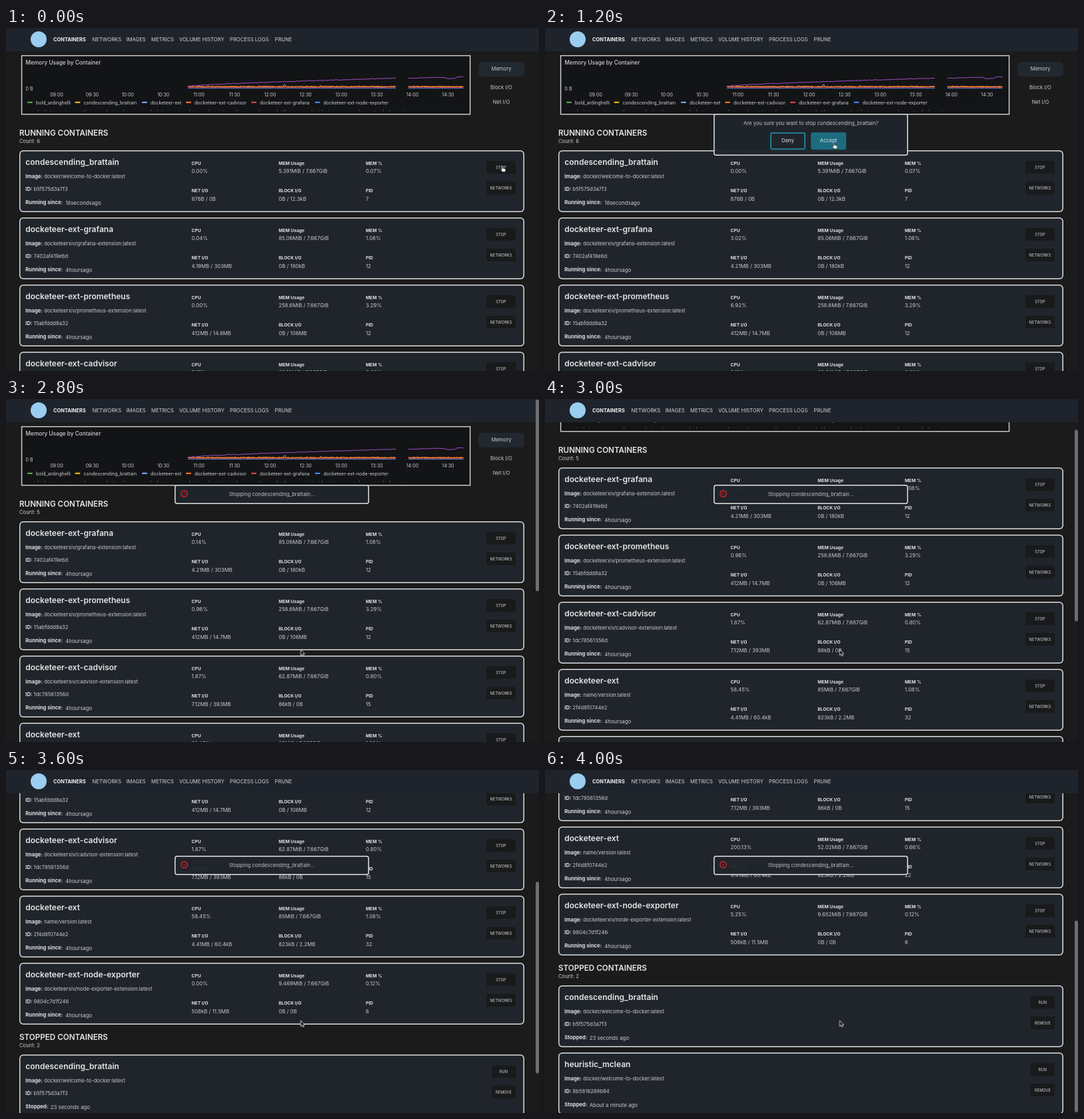
An HTML page for the animation above (4050 ms loop, 800 px wide and 516 px high).

```html
<!DOCTYPE html>
<html lang="en">
<head>
<meta charset="utf-8">
<title>Containers</title>
<style>
@property --scroll { syntax: "<number>"; inherits: true; initial-value: 0; }
html, body { margin: 0; width: 100%; height: 100%; overflow: hidden; background: #1b1b1b; }
#stage {
  position: relative; width: 800px; height: 516px; overflow: hidden;
  background: #1b1b1b; color: #c9cbcd;
  font: 7.7px/10px Inter, "Open Sans", sans-serif;
  animation: scroll 4050ms infinite;
}
#stage * { box-sizing: border-box; }
.t { position: absolute; margin-top: -5px; white-space: pre; }
.mid { transform: translateX(-50%); }
b.t { font-weight: 700; color: #dfe0e1; }
.small { font-size: 6.7px; }
.value { font-size: 7.85px; }
nav { position: absolute; inset: 0 0 auto; height: 35px; background: #1f242c; z-index: 2; }
nav .t { font-size: 7.65px; color: #d3d5d8; }
nav b.t { font-size: 7.45px; color: #f2f2f2; }
.logo { position: absolute; left: 37px; top: 5px; width: 24px; height: 24px; border-radius: 50%; background: #9acdf0; }
#page { position: absolute; left: 0; top: 0; width: 800px; transform: translateY(calc(var(--scroll) * -1px)); }
#chart { position: absolute; left: 22px; top: 40px; }
#lists { padding: 147px 0 0 20px; }
.head { position: relative; height: 37px; }
.head h2 { margin: -5px 0 0; position: absolute; top: 11px; font-size: 11.65px; font-weight: 600; line-height: 10px; color: #e6e6e6; white-space: pre; }
.card {
  position: relative; width: 758px; height: 92.5px; margin-bottom: 8.5px;
  border-radius: 6px; background: #20252b; box-shadow: inset 0 0 0 1.5px #dcddde;
}
.card .name { font-size: 12px; font-weight: 600; color: #e4e4e4; }
.btn { position: absolute; right: 13px; height: 19px; border-radius: 1.5px; background: #191a1b; font-size: 5.75px; line-height: 19px; text-align: center; color: #d5d6d7; }
.gone .first { display: none; }
.tab { position: absolute; left: 709px; top: 51px; width: 69px; height: 22px; border-radius: 5px; background: #212830; }
#thumb {
  position: absolute; left: 795px; top: 1px; width: 5px; height: 288px; border-radius: 2px;
  background: #6d6e6f; z-index: 3; transform: translateY(calc(var(--scroll) * .5615px));
  animation: bar 4050ms step-end infinite;
}
.pop {
  position: absolute; left: 253.3px; top: 129.4px; width: 291.7px; z-index: 4;
  border-radius: 4px; background: rgba(32, 37, 44, .95); box-shadow: inset 0 0 0 1.5px #e2e3e4;
}
.pop .t { left: 145.8px; top: 15.1px; color: #c0c3c6; }
#ask { height: 62.6px; animation: ask 4050ms step-end infinite; }
#toast { height: 29px; animation: toast 4050ms step-end infinite; }
.pop button {
  position: absolute; top: 28px; width: 53px; height: 26px; padding: 0; border: 0;
  border-radius: 3px; background: #20252c; box-shadow: inset 0 0 0 1.8px #24869b; font: inherit; color: #dfe1e3;
}
.pop .yes { background: #1c6c7f; box-shadow: none; }
#spin { position: absolute; left: 7.8px; top: 6.4px; animation: spin 900ms linear infinite; }
#cursor { position: absolute; left: 0; top: 0; z-index: 5; overflow: visible; animation: move 4050ms infinite; }
#hand { animation: hand 4050ms step-end infinite; }
#arrow { animation: arrow 4050ms step-end infinite; }

@keyframes scroll {
  0%, 69.13% { --scroll: 0; animation-timing-function: step-end; }
  70.36% { --scroll: 8; animation-timing-function: step-end; }
  71.6% { --scroll: 27; animation-timing-function: step-end; }
  72.83% { --scroll: 53; animation-timing-function: step-end; }
  74.06% { --scroll: 81; animation-timing-function: step-end; }
  75.3% { --scroll: 135; animation-timing-function: step-end; }
  76.53% { --scroll: 195; animation-timing-function: step-end; }
  82.7% { --scroll: 246; animation-timing-function: step-end; }
  83.94% { --scroll: 264; animation-timing-function: steps(4); }
  88.88% { --scroll: 298; animation-timing-function: steps(8); }
  98.75%, 100% { --scroll: 402; }
}
@keyframes bar { 0% { opacity: 0; } 69.13%, 100% { opacity: 1; } }
@keyframes ask { 0% { opacity: 0; } 6.17% { opacity: 1; } 37.03%, 100% { opacity: 0; } }
@keyframes toast { 0% { opacity: 0; } 37.03%, 100% { opacity: 1; } }
@keyframes spin { to { transform: rotate(360deg); } }
@keyframes hand { 0% { opacity: 1; } 8.64% { opacity: 0; } 20.98% { opacity: 1; } 37.03%, 100% { opacity: 0; } }
@keyframes arrow { 0% { opacity: 0; } 8.64% { opacity: 1; } 20.98% { opacity: 0; } 37.03%, 100% { opacity: 1; } }
@keyframes move {
  0%, 7.41% { transform: translate(745px, 207px); animation-timing-function: ease-in-out; }
  22.22%, 55.55% { transform: translate(433.7px, 172.3px); animation-timing-function: ease-in-out; }
  67.9%, 100% { transform: translate(442.3px, 377px); }
}
</style>
</head>
<body>
<div id="stage">
  <div id="page">
    <svg id="chart" width="676" height="92" viewBox="22 40 676 92" font-family="Inter, sans-serif"></svg>
    <div class="tab"></div>
    <span class="t mid" style="left:743.5px;top:62px">Memory</span>
    <span class="t mid" style="left:743.5px;top:90px">Block I/O</span>
    <span class="t mid" style="left:743.5px;top:111.5px">Net I/O</span>
    <div id="lists"></div>
  </div>
  <nav id="nav"><i class="logo"></i></nav>
  <div id="thumb"></div>
  <div id="ask" class="pop">
    <span class="t mid">Are you sure you want to stop condescending_brattain?</span>
    <button style="left:84.7px">Deny</button>
    <button class="yes" style="left:145.7px">Accept</button>
  </div>
  <div id="toast" class="pop">
    <svg id="spin" width="13" height="13" viewBox="-6.5 -6.5 13 13" fill="none" stroke="#d62227">
      <circle r="4.5" stroke-width="1.3"/>
      <circle r="5.2" stroke-width=".9" stroke-dasharray="2.1 1.98"/>
      <path d="M0-1.6L1.5 1.1H-1.5Z" fill="#d62227" stroke="none"/>
    </svg>
    <span class="t mid">Stopping condescending_brattain...</span>
  </div>
  <svg id="cursor" width="12" height="14">
    <path id="arrow" d="M0 0V8.6L2 6.8L3.4 9.8L4.9 9.1L3.6 6.2H6.2Z" fill="#111" stroke="#f4f4f4" stroke-width=".8"/>
    <path id="hand" d="M-.8 1Q0-.3.8 1V4L4.4 4.7Q5.3 5 5.1 6.3L4.3 9.5H.1L-2.7 6Q-2.8 4.9-1.7 5.2L-.8 6Z" fill="#f6f6f6" stroke="#111" stroke-width=".6"/>
  </svg>
</div>
<script>
const LOOP = 4050;
const PHASES = [0, 850, 1950, 2800, 3900];
const $ = id => document.getElementById(id);

// Navigation
[[71, "CONTAINERS"], [129.5, "NETWORKS"], [180.5, "IMAGES"], [218, "METRICS"],
 [260, "VOLUME HISTORY"], [336, "PROCESS LOGS"], [403.5, "PRUNE"]].forEach(([x, s], i) => {
  const tag = i ? "span" : "b";
  $("nav").innerHTML += `<${tag} class="t" style="left:${x}px;top:18px">${s}</${tag}>`;
});

// Chart
let seed = 7;
const rand = () => (seed = seed * 16807 % 2147483647) / 2147483647;
const label = (x, y, s, size = 7, extra = "") =>
  `<text x="${x}" y="${y + size * .364}" font-size="${size}" fill="#cfd0d4" ${extra}>${s}</text>`;

function line(color, x0, x1, height, noise, width = .9) {
  let d = "";
  for (let x = x0; x <= x1; x += 1.5)
    d += `${d ? "L" : "M"}${x} ${(height(x) + (rand() - .5) * noise).toFixed(2)}`;
  return `<path d="${d}" fill="none" stroke="${color}" stroke-width="${width}"/>`;
}

function drawChart() {
  let out = `<rect x="23.6" y="41.6" width="673" height="88.2" fill="#131416" stroke="#d4d5d6" stroke-width="1.4"/>`;
  out += label(29.5, 52, "Memory Usage by Container", 8.25, 'font-weight="500"') + label(29.5, 91, "0 B");
  for (let i = 0; i < 12; i++) {
    const hour = String(9 + (i >> 1)).padStart(2, "0");
    out += label(76 + i * 53.4, 100, `${hour}:${i % 2 ? "30" : "00"}`, 7, 'text-anchor="middle"');
  }
  const spike = x => [[380, 2], [418, 6], [472, 3], [506, 2]]
    .reduce((sum, [at, h]) => sum + h * Math.max(0, 1 - Math.abs(x - at) / 1.6), 0);
  const rise = x => 87.5 - 12 * ((x - 273) / 312) ** .75;
  const late = x => 75.5 - (x - 604) * .025 + (x > 658 && x < 676 ? 2 : 0);
  for (const [a, b] of [[273, 585], [604, 687]]) {
    out += line("#5794f2", a, b, () => 90.6, .5);
    out += line("#8ab8ff", a, b, x => 88.4 - spike(x), 1);
    out += line("#f2495c", a, b, () => 89.3, .8);
    out += line("#ff780a", a, b, () => 88, 1.2, 1.2);
    out += line("#a352cc", a, b, a < 300 ? rise : late, .9, 1);
  }
  const legend = [[45, "#56a64b", "bold_ardinghelli"], [116.5, "#e8b90c", "condescending_brattain"],
    [217, "#73a5f5", "docketeer-ext"], [283, "#f2701d", "docketeer-ext-cadvisor"],
    [381, "#e0404f", "docketeer-ext-grafana"], [476.5, "#4286f0", "docketeer-ext-node-exporter"]];
  for (const [x, color, s] of legend)
    out += `<rect x="${x - 13}" y="110.8" width="8" height="2.2" rx="1" fill="${color}"/>` + label(x, 112, s);
  out += `<clipPath id="fold"><rect x="25" y="118" width="670" height="6.8"/></clipPath><g clip-path="url(#fold)" opacity=".75">`;
  [[45, "docketeer-ext-prometheus"], [150, "festive_boxes"], [214, "docketeer-ext-socket"],
   [304, "heuristic_mclean"], [380, "hungry_kettle"], [446, "modest_lanterns"], [520, "welcome-to-docker-extension"]]
    .forEach(([x, s]) => out += label(x, 126, s));
  $("chart").innerHTML = out + "</g>";
}

// Containers; a bar separates successive readings
const ext = s => `docketeerxiv/${s}-extension:latest`;
const GIB = " / 7.667GiB";
const running = [
  ["condescending_brattain", "docker/welcome-to-docker:latest", "b5f575d3a7f3", "18secondsago",
    ["0.00%", "5.391MiB", "0.07%", "876B / 0B", "0B / 12.3kB", "7"]],
  ["docketeer-ext-grafana", ext("grafana"), "7402af419e6d", "4hoursago",
    ["0.04%|3.02%|0.14%", "85.06MiB", "1.08%", "4.19MB / 303MB|4.21MB / 303MB", "0B / 180kB", "12"]],
  ["docketeer-ext-prometheus", ext("prometheus"), "15abfddd8a32", "4hoursago",
    ["0.00%|6.92%|0.00%|0.96%", "258.6MiB", "3.29%", "412MB / 14.6MB|412MB / 14.7MB", "0B / 106MB", "12"]],
  ["docketeer-ext-cadvisor", ext("cadvisor"), "1dc78561356d", "4hoursago",
    ["5.17%|2.19%|4.42%|1.87%", "62.18MiB|62.93MiB|62.85MiB|62.87MiB", "0.80%", "7.12MB / 393MB", "86kB / 0B", "15"]],
  ["docketeer-ext", "name/version:latest", "2f4d8f0744e2", "4hoursago",
    ["58.45%|58.45%|58.45%|58.45%|200.13%", "85MiB|85MiB|85MiB|85MiB|52.02MiB", "1.08%|1.08%|1.08%|1.08%|0.66%",
     "4.41MB / 60.4kB", "823kB / 2.2MB", "32|32|32|32|22"]],
  ["docketeer-ext-node-exporter", ext("node-exporter"), "9804c7d1f246", "4hoursago",
    ["0.00%|0.00%|0.00%|0.00%|5.25%", "9.469MiB|9.469MiB|9.469MiB|9.469MiB|9.652MiB", "0.12%", "508kB / 11.5MB", "0B / 0B", "6"]],
];
const stopped = [
  ["condescending_brattain", "docker/welcome-to-docker:latest", "b5f575d3a7f3", "23 seconds ago"],
  ["heuristic_mclean", "docker/welcome-to-docker:latest", "8b5816289b94", "About a minute ago"],
];
const FIELDS = ["CPU", "MEM Usage", "MEM %", "NET I/O", "BLOCK I/O", "PID"];

const text = (x, y, s, cls = "", tag = "span", data = "") =>
  `<${tag} class="t ${cls}" style="left:${x}px;top:${y}px" ${data}>${s}</${tag}>`;
const button = (y, w, s) => `<div class="btn" style="top:${y}px;width:${w}px">${s}</div>`;
const head = (title, count) => `<div class="head"><h2>${title}</h2>${text(0, 24, count)}</div>`;

function card([name, image, id, when, stats], i) {
  let out = text(9.3, 17.5, name, "name", "b");
  out += text(9.3, 39.5, "Image:", "", "b") + text(37.2, 39.5, image);
  out += text(9.3, 59, "ID:", "", "b") + text(21.5, 59, id);
  out += text(9.3, 78.5, stats ? "Running since:" : "Stopped:", "", "b") + text(stats ? 69.2 : 46.7, 78.5, when, "value");
  if (stats) {
    FIELDS.forEach((field, k) => {
      const x = 258.5 + k % 3 * 130.7, y = k < 3 ? 19.5 : 61;
      out += text(x, y, field, "small", "b");
      out += text(x, y + 11.5, "", "value", "span", `data-values="${stats[k]}" data-unit="${k === 1 ? GIB : ""}"`);
    });
    out += button(16, 44, "STOP") + button(47, 44, "NETWORKS");
  } else {
    out += button(16, 36, "RUN") + button(47, 36, "REMOVE");
  }
  return `<div class="card ${stats && !i ? "first" : ""}">${out}</div>`;
}

drawChart();
$("lists").innerHTML = head("RUNNING CONTAINERS", `Count: <span id="count"></span>`) + running.map(card).join("") +
  head("STOPPED CONTAINERS", "Count: 2") + stopped.map(card).join("");
const readings = document.querySelectorAll("[data-values]");

let shown = -1;
function show(phase) {
  if (phase === shown) return;
  shown = phase;
  for (const el of readings) {
    const values = el.dataset.values.split("|");
    el.textContent = values[Math.min(phase, values.length - 1)] + el.dataset.unit;
  }
  $("stage").classList.toggle("gone", phase > 2);
  $("count").textContent = phase > 2 ? 5 : 6;
}

let start;
function tick(now) {
  start ??= now;
  const t = (now - start) % LOOP;
  show(PHASES.filter(p => p <= t).length - 1);
  requestAnimationFrame(tick);
}
show(0);
requestAnimationFrame(tick);
</script>
</body>
</html>
```
